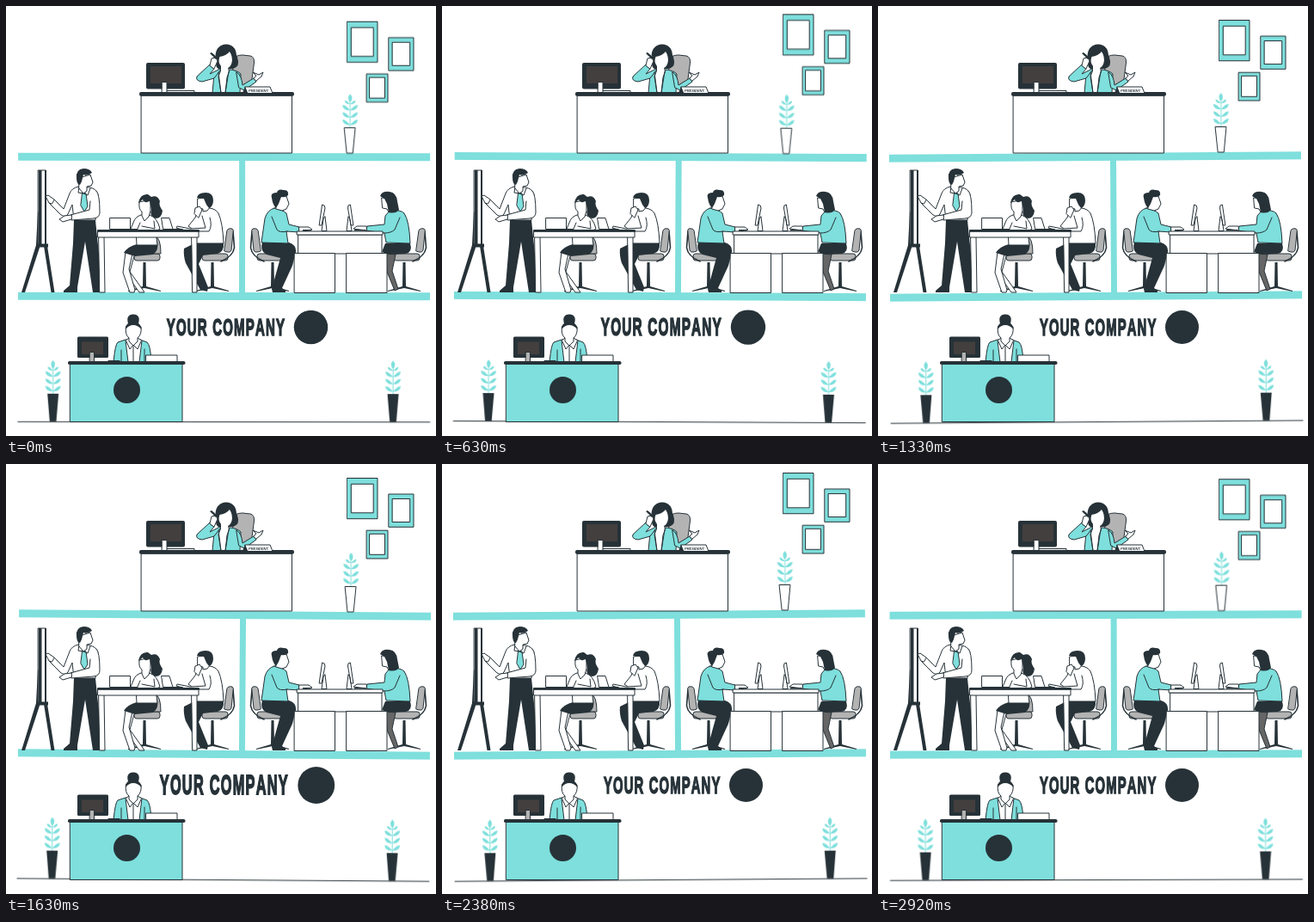
Write an HTML page that moves like this. It is 500 px wide and 500 px high and loops after 2.96 s.

```html
<!DOCTYPE html>
<html lang="en">
<head>
<meta charset="utf-8">
<title>Office building</title>
<style>
  html, body { margin: 0; width: 100%; height: 100%; overflow: hidden; background: #fff; }
  svg { display: block; width: 100%; height: 100%; }
  .o, .t, .g, .l { stroke: #263238; stroke-width: 1; stroke-linejoin: round; stroke-linecap: round; }
  .o { fill: #fff; }
  .t { fill: #7edfdc; }
  .g { fill: #b3b3b3; }
  .l { fill: none; }
  .d { fill: #263238; }
  .teal { fill: #7edfdc; }
  .screen { fill: #433f3f; }
  text { font-family: "Liberation Sans", Arial, sans-serif; font-weight: bold; fill: #263238; }
  .title { font-size: 28px; font-kerning: none; letter-spacing: 2.15px; stroke: #263238; stroke-width: 1.6; }
  .plate { font-size: 4px; font-style: italic; }

  /* Each 1.5 s cycle runs almost twice, then the loop restarts at 2.96 s. */
  .sway, .float, .beat { animation: 2960ms linear infinite; }
  .sway { animation-name: sway; transform-origin: 253.5px 327.5px; }
  .plants { transform-origin: 252.5px 293px; }
  .float { animation-name: float; }
  .beat { animation-name: beat; transform-origin: 280.5px 373.5px; }
  @keyframes sway {
    0% { transform: rotate(.053deg); }
    11.993%, 62.669% { transform: rotate(1deg); }
    37.331%, 88.007% { transform: rotate(-1deg); }
    50% { transform: rotate(0deg); }
    100% { transform: rotate(-.053deg); }
  }
  @keyframes float {
    0%, 100% { transform: translateY(-.27px); }
    24.662%, 75.338% { transform: translateY(-10px); }
    50% { transform: translateY(0); }
  }
  @keyframes beat {
    0% { transform: scale(1.0133); }
    4.392%, 24.662%, 55.068%, 75.338% { transform: scale(1.1); }
    14.527%, 19.595%, 29.73%, 50%, 65.203%, 70.27%, 80.405%, 100% { transform: scale(1); }
  }
</style>
</head>
<body>
<svg viewBox="0 0 500 500">
  <defs>
    <path id="leaf" d="M0 0Q2-2 4-4Q6-6 9-6Q8 1 0 0Z"/>
    <g id="pair"><use href="#leaf"/><use href="#leaf" transform="scale(-1 1)"/></g>
    <g id="leaves" class="teal">
      <path d="M-.5 0V-34H.5V0ZM0-29Q-4.500-34 0-39Q4.500-34 0-29Z"/>
      <use href="#pair" y="-3"/><use href="#pair" y="-11.500"/><use href="#pair" y="-20"/>
      <use href="#pair" transform="translate(0 -27) scale(.7)"/>
    </g>
    <g id="tallPlant">
      <use href="#leaves"/>
      <path class="d" d="M-6.500 0H6.500L3.800 32.500H-3.800Z"/>
    </g>
    <g id="seat">
      <path class="d" d="M238.500 298H241.500L242 326L259 331V332L240 328L221 332V331L238 326Z"/>
      <rect class="g" x="228" y="288" width="30" height="8" rx="3"/>
    </g>
    <g id="chair">
      <use href="#seat"/>
      <path class="l" style="stroke-width:1.6" d="M264 262L265.500 281Q264 291 250 297"/>
      <path class="g" d="M257 261Q258 258 263 259Q265 260 264 264L262 284Q261 287 257 286L254 285Z"/>
    </g>
  </defs>

  <!-- floors, wall and plants -->
  <g class="sway">
    <path class="teal" d="M14 171H493V180H278V333H493V342H14V333H271V180H14Z"/>
    <path class="l" d="M14 483.700H493"/>
  </g>
  <g class="sway plants">
    <use href="#leaves" x="400" y="141"/>
    <path class="o" d="M393.500 141.500H406L403.200 171H396.500Z"/>
    <use href="#tallPlant" x="54.800" y="451"/>
    <use href="#tallPlant" x="450.200" y="451"/>
  </g>

  <!-- wall pictures -->
  <g class="float">
    <path class="t" d="M396.700 18.500H432V65.700H396.700ZM445.200 37H474V75.300H445.200ZM419.500 79.200H444V112H419.500Z"/>
    <path class="o" d="M401.700 25.300H427.200V58.800H401.700ZM449.500 42.500H469.700V69.500H449.500ZM423 83.300H440.500V107.300H423Z"/>
  </g>

  <!-- president -->
  <path class="g" d="M264 62Q267 57 275 57L284 58Q289 59 288.500 66L286 85Q285 92 279 93H264Z"/>
  <path class="d" d="M249 74Q243 72 244.500 66Q246 62 243.500 57Q245 45 256 44.500Q267 45 268 57Q271 64 269.500 69Q266 74 259 73Z"/>
  <path class="t" d="M250 74L242 79L240 101H272L273 79Q269 75 261 74Z"/>
  <path class="o" d="M250 74L247 82L250 101H255L257 83L260 75Z"/>
  <path class="t" d="M249 75L242 84L228 88Q220 87 222 82L237 68L242 73L237 79L249 73Z"/>
  <path class="o" d="M237 69L239 61L244 60L246 64L242 73Z"/>
  <path class="d" d="M237 55L239 54L246 60L244 62Z"/>
  <path fill="#fff" d="M248.500 59Q256 58 260 53Q264 59 262.500 66Q261 71 258 72L259 77L254 81L250 76V70Q246 65 248.500 59Z"/>
  <path class="l" d="M247 77L250 101M259 76L255 101"/>
  <path class="t" d="M268 77Q274 80 275 92L288 84L291 88L277 98L271 95Z"/>
  <path class="o" d="M288 84L291 81L287 77L294 80L299 77L297 82L291 87Z"/>
  <path class="o" d="M187 98.500H219V101H187Z"/>
  <rect class="d" x="163" y="66" width="45" height="30.500" rx="2"/>
  <path class="screen" d="M168 70H204V90H168Z"/>
  <path class="o" d="M181.500 88.500H187V101H181.500Z"/>
  <path class="o" d="M157.500 104H332.500V171H157.500Z"/>
  <rect class="d" x="155" y="100" width="180" height="4.700" rx="2"/>
  <path class="o" d="M278 94H307L310 101.500H281Z"/>
  <path class="d" d="M278 94L274.500 102H281.500Z"/>
  <text class="plate" x="282" y="99.500">PRESIDENT.</text>

  <!-- presentation -->
  <path class="d" d="M37 239H40V278L22 333H18L35 278ZM44 279H48L56.500 333H52.500Z"/>
  <path class="o" d="M37.500 191H46.500V278H37.500Z"/>
  <path class="d" d="M38 191H41.500V278H38ZM45 191H47V278H45ZM35 276.500H49V280.500H35Z"/>
  <path class="d" d="M79 249H104L108 288L110 328L115 331V333H101L92 274L83 327V333H67V331L74 325L78 276Z"/>
  <path class="o" d="M84 210Q76 212 74 218L67 236L55 224L50 229L64 243Q69 246 72 242L77 231L79 249H104L107 219Q105 212 97 211Z"/>
  <path class="o" d="M56 225L49 220L46 221L50 229L53 230Z"/>
  <path class="t" d="M89 217L93 218L95 233L91 239L87 232Z"/>
  <path class="l" d="M85 210L84 217L90 218L95 220L98 212"/>
  <path class="o" d="M105 215Q109 218 109 240Q109 246 102 247L76 249L75 243L97 237L98 227"/>
  <path class="o" d="M76 243L68 244L62 248L66 251L76 248Z"/>
  <path class="o" d="M85 200L98 196L101 205L99 209L94 210V215L90 218L85 212Z"/>
  <path class="d" d="M82 200Q81 190 90 189Q98 189 100 194Q94 198 90 196L88 204L86 208Q82 207 82 200Z"/>

  <!-- meeting -->
  <use href="#seat" x="-79"/>
  <path class="g" d="M174 268Q180 270 180 288H172Z"/>
  <path class="o" d="M150 287L144 309L159 330L161 333H155L138 309L140 287Z"/>
  <path class="o" d="M147 288L143 306L150 330L149 333H144L136 310L139 286Z"/>
  <path class="d" d="M152 277L176 275Q178 284 171 289L150 291L137 287Q141 280 152 277Z"/>
  <path class="o" d="M157 243Q150 245 148 252L145 259L151 262L152 278H176L174 262L179 259Q176 246 167 243Z"/>
  <path class="o" d="M155 228L168 225V238L166 245L161 250L158 244V239Q154 237 155 228Z"/>
  <path class="d" d="M154 229Q156 218 165 219L169 222Q176 219 179 227Q177 231 182 238Q181 247 174 247Q166 244 169 237L167 227Q161 230 159 225Z"/>
  <path class="l" d="M153 259L156 252M172 250L173 259L158 256"/>
  <use href="#chair"/>
  <path class="d" d="M221 275H253Q254 286 246 288L229 290L224 300L235 327L234 332L226 330L209 299Q206 290 207 282Z"/>
  <path class="o" d="M229 235Q222 239 220 246L212 256L219 261L221 276H253Q252 252 247 241Q244 236 237 235Z"/>
  <path class="o" d="M228 244L232 258L214 259L199 256L198 258L212 262L236 262Q240 256 237 246"/>
  <path class="o" d="M223 224L236 222L238 233L234 238L229 239V236L223 235Z"/>
  <path class="d" d="M222 223Q223 217 232 217Q241 217 241 226Q241 233 236 235L233 231L230 224Z"/>
  <path class="o" d="M219 241L220 235L225 233L228 237L224 246Z"/>
  <path class="o" d="M108 268H114L115 333H109ZM216 268H222V333H217Z"/>
  <path class="o" d="M107 262H224V269H107Z"/>
  <rect class="d" x="106" y="260" width="119" height="2.800" rx="1"/>
  <path class="o" d="M121 246.500H144.500V259.500H121ZM181 246.500H190L194 259.500H183Z"/>
  <path class="l" d="M140 259.500H153M193 259.500H205"/>

  <!-- shared desk -->
  <use href="#chair" transform="translate(550 0) scale(-1 1)"/>
  <use href="#chair" x="223"/>
  <path class="d" d="M298 275H329Q338 278 337 286L333 302L321 328L325 331V333H310L309 329L319 293L303 289Q295 285 298 275Z"/>
  <path class="t" d="M312 235Q304 237 301 247L297 275L328 276L326 262L341 263V257L329 254L326 241Q322 237 312 235Z"/>
  <path class="l" d="M309 245L315 260Q318 264 327 262"/>
  <path class="o" d="M341 257L352 257L356 260L341 263Z"/>
  <path class="o" d="M315 222L326 221L329 230L326 236L321 238L314 236Z"/>
  <path class="d" d="M309 223Q307 217 315 217Q316 212 323 214Q329 214 328 220Q325 223 320 222L317 230L314 235Q310 231 309 223Z"/>
  <path fill="#666" stroke="#263238" d="M442 288L453 289L449 308L456 329L452 331L443 309Z"/>
  <path class="d" d="M441 276H470Q473 286 465 288L446 289L437 286Z"/>
  <path class="t" d="M447 237L441 244L440 254L420 256L418 261L440 264L442 275L470 276Q469 250 463 241Q459 237 447 237Z"/>
  <path class="l" d="M458 246L452 260Q448 264 440 264"/>
  <path class="o" d="M419 256L408 256L404 259L419 261Z"/>
  <path class="o" d="M437 223L450 224V236L445 240L443 236L438 235Z"/>
  <path class="d" d="M435 221Q437 215 446 216Q454 217 455 227L457 237Q453 242 445 240L443 230L440 224Z"/>
  <path class="o" d="M340 266H437V288H340Z"/>
  <path class="o" d="M335.500 287.500H382.500V333.500H335.500ZM396 287.500H443V333.500H396Z"/>
  <path class="o" d="M338.500 262H438V266H338.500Z"/>
  <path class="d" d="M345 260H355V261.500H345ZM405 260H418V261.500H405Z"/>
  <path class="o" d="M368 231Q371 231 371 235L367 255H364.500ZM371 245L373 261.500H367L369 248Z"/>
  <path class="o" d="M400 231Q397 231 397.500 235L401 255H403.500ZM398 245L396 261.500H402L400 248Z"/>

  <!-- company name -->
  <g class="beat">
    <text class="title" transform="translate(188 383) scale(.53 1)">YOUR COMPANY</text>
    <circle class="d" cx="353.500" cy="373.500" r="19.500"/>
  </g>

  <!-- reception -->
  <path class="t" d="M139 388L130 391Q127 393 125 414H169Q168 394 164 391L156 388Z"/>
  <path class="o" d="M143 386L139 389L142 414H155L158 389L153 386Z"/>
  <path class="l" d="M134 400V414M161 399V414M140 390L144 399L148 394L153 399L157 390M148 395V414"/>
  <path class="o" d="M139.500 373Q148 366 157 373Q158 382 153 386V390L148 395L143 390V386Q138 382 139.500 373Z"/>
  <path class="d" d="M139 376Q139 371 142 369Q139 359 148 358.500Q157 359 154 369Q157 371 157.500 376Q153 371 148 371Q143 371 139 376Z"/>
  <rect class="d" x="83" y="384.500" width="36" height="24.500" rx="1.500"/>
  <path class="screen" d="M88 390.500H113V405H88Z"/>
  <path class="g" d="M97.500 402.500H102.500V414H97.500Z"/>
  <path class="o" d="M163 406H199V413.500H163Z"/>
  <path class="l" d="M119 412.500H132"/>
  <path class="t" d="M74.700 416H205V483.500H74.700Z"/>
  <rect class="d" x="72" y="413" width="136.500" height="4" rx="1.800"/>
  <circle class="d" cx="140.500" cy="446.500" r="15.500"/>
</svg>
</body>
</html>
```
